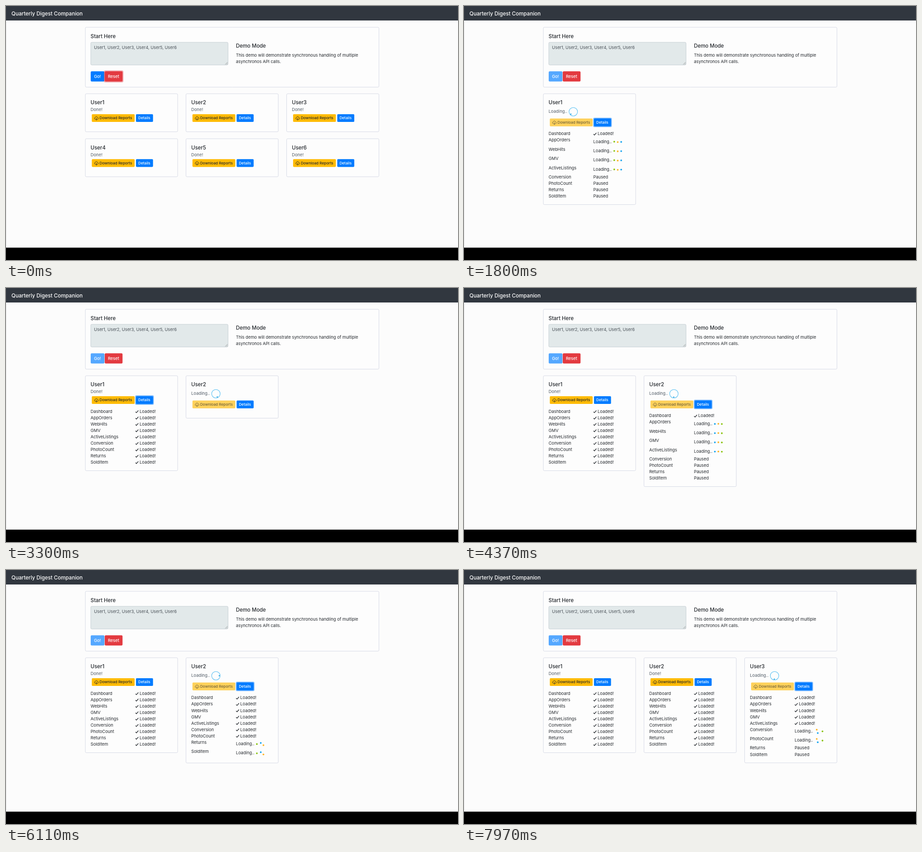
Recreate the animation shown at these times as an HTML page with a canvas. Size 998 by 561 pixels, loop 8000 ms.

```html
<!DOCTYPE html>
<html lang="en">
<head>
<meta charset="utf-8">
<title>Report loader</title>
<style>
html, body { margin: 0; width: 100%; height: 100%; overflow: hidden; background: #fcfcfc; }
canvas { display: block; width: 998px; height: 561px; }
</style>
</head>
<body>
<canvas id="stage"></canvas>
<script>
const W = 998, H = 561, LOOP = 8000;
const INK = '#24282d', MUTED = '#69727b', BLUE = '#007bff', RED = '#e33a40', AMBER = '#ffbb05';
const BODY = 9.3, HEAD = 11.4, SMALL = 8.2;
const PITCH = 222.2, ROW = 14.05, TALL_ROW = 20.4;
const CLEAR = 260, GO = 900;

const rows = ['Dashboard', 'AppOrders', 'WebHits', 'GMV', 'ActiveListings',
  'Conversion', 'PhotoCount', 'Returns', 'SoldItem'];

// Each batch of rows loads together: [first row, row after the last].
const batches = [[0, 1], [1, 5], [5, 7], [7, 9]];

// Times at which a user's batches begin, with the end of the last one.
const users = [
  { open: 1250, steps: [925, 1500, 2150, 2400, 2614] },
  { open: 3650, steps: [2614, 3450, 4750, 5600, 6209] },
  { open: 6650, steps: [6209, 6750, 7580, 8200, 8600] }
];

// Shuffling dots
const STEP = 122.5;
const DOT_COLORS = ['#8cc414', '#fdb62b', '#1ea7f0'];

const canvas = document.getElementById('stage');
const ctx = canvas.getContext('2d');
const dpr = window.devicePixelRatio || 1;
canvas.width = W * dpr;
canvas.height = H * dpr;

function text(str, x, midY, size = BODY, color = INK, weight = 400) {
  ctx.font = `${weight} ${size}px Inter, "Open Sans", sans-serif`;
  ctx.fillStyle = color;
  ctx.fillText(str, x, midY + size * 0.36);
}

function box(x, y, w, h, r, fill, stroke) {
  ctx.beginPath();
  ctx.roundRect(x, y, w, h, r);
  if (fill) {
    ctx.fillStyle = fill;
    ctx.fill();
  }
  if (stroke) {
    ctx.strokeStyle = stroke;
    ctx.lineWidth = 1;
    ctx.stroke();
  }
}

function disc(x, y, r, color) {
  ctx.beginPath();
  ctx.arc(x, y, r, 0, Math.PI * 2);
  ctx.fillStyle = color;
  ctx.fill();
}

function line(points, color, width) {
  ctx.beginPath();
  points.forEach(([x, y]) => ctx.lineTo(x, y));
  ctx.strokeStyle = color;
  ctx.lineWidth = width;
  ctx.stroke();
}

function card(x, y, w, h) {
  box(x, y, w, h, 2.3, '#fdfdfd', '#d6d9e5');
}

function cloud(x, y) {
  ctx.save();
  ctx.translate(x, y);
  ctx.beginPath();
  ctx.moveTo(3, 6.3);
  ctx.lineTo(2.4, 6.3);
  ctx.bezierCurveTo(-0.2, 6.2, -0.1, 3.1, 2, 2.9);
  ctx.bezierCurveTo(2.5, -0.3, 6.7, -0.2, 7.1, 2.7);
  ctx.bezierCurveTo(9.8, 2.8, 9.7, 6.3, 7.3, 6.3);
  ctx.lineTo(6.4, 6.3);
  ctx.strokeStyle = INK;
  ctx.lineWidth = 0.95;
  ctx.stroke();
  line([[4.7, 3.6], [4.7, 8.2]], INK, 0.95);
  line([[3, 6.7], [4.7, 8.4], [6.4, 6.7]], INK, 0.95);
  ctx.restore();
}

function downloadButton(x, midY, enabled) {
  ctx.globalAlpha = enabled ? 1 : 0.65;
  box(x, midY - 8.6, 94.5, 17.2, 1.8, AMBER);
  cloud(x + 5.4, midY - 3.8);
  text('Download Reports', x + 17, midY, SMALL, INK, 450);
  ctx.globalAlpha = 1;
}

function detailsButton(x, midY, focused, hover) {
  if (focused) box(x - 1.8, midY - 10.4, 41.2, 20.8, 3, 'rgba(0,123,255,.5)');
  box(x, midY - 8.6, 37.6, 17.2, 1.8, hover ? '#0064d0' : BLUE);
  text('Details', x + 5, midY, SMALL, '#fff', 500);
}

function ring(x, y, age) {
  ctx.beginPath();
  ctx.arc(x, y, 9.4, 0, Math.PI * 2);
  ctx.strokeStyle = '#52bdf2';
  ctx.lineWidth = 1.1;
  ctx.stroke();
  const a = Math.PI + age / 1000 * Math.PI * 2;
  disc(x + 7.4 * Math.cos(a), y + 7.4 * Math.sin(a), 1.3, '#189fe0');
}

// Neighbouring dots trade places along a half circle, left pair and right pair in turn.
function shuffle(x, y, t) {
  const phase = (((t - 1800) / STEP + 0.03) % 6 + 6) % 6;
  const done = Math.floor(phase);
  const order = [0, 1, 2];
  for (let i = 0; i < done; i++) {
    const k = i % 2;
    [order[k], order[k + 1]] = [order[k + 1], order[k]];
  }
  const gap = 7.7, left = done % 2, a = (phase - done) * Math.PI;
  order.forEach((color, slot) => {
    let dx = slot * gap, dy = 0;
    if (slot === left || slot === left + 1) {
      const side = slot === left ? -1 : 1;
      dx = (left + 0.5) * gap + side * Math.cos(a) * gap / 2;
      dy = side * Math.sin(a) * gap / 2;
    }
    disc(x + dx, y + dy, 1.9, DOT_COLORS[color]);
  });
}

function rowStatus(x, y, state, t) {
  if (state === 'loaded') {
    line([[x + 0.4, y + 1], [x + 2.5, y + 3], [x + 6.8, y - 1.9]], INK, 1.35);
    text('Loaded!', x + 9.6, y);
  } else if (state === 'loading') {
    text('Loading..', x, y + 3.2);
    shuffle(x + 46.2, y + 4, t);
  } else {
    text('Paused', x, y);
  }
}

function rowState(i, batch) {
  if (batch >= batches.length) return 'loaded';
  const [from, to] = batches[batch];
  return i < from ? 'loaded' : i < to ? 'loading' : 'paused';
}

function userCard(i, y, t, { batch, open, focused, hover, age }) {
  const x = 175 + (i % 3) * PITCH;
  const done = batch >= batches.length;
  const shift = done ? 0 : 9.7;
  const states = rows.map((_, n) => rowState(n, batch));
  const first = y + 78.6 + shift;
  let height = 84 + shift;
  if (open) {
    const busy = states.filter(s => s === 'loading').length;
    height = 78.6 + shift + 8 * ROW + busy * (TALL_ROW - ROW) + 18.7;
    if (states[8] === 'loading') height += 0.3;
  }
  card(x + 0.2, y, 203.8, height);
  text('User' + (i + 1), x + 11.8, y + 19.3, HEAD, INK, 500);
  text(done ? 'Done!' : 'Loading..', x + 11.8, y + (done ? 35.2 : 39.2), BODY, MUTED, 500);
  if (!done) ring(x + 66.3, y + 39.8, age);
  const mid = y + 53.7 + shift;
  downloadButton(x + 14.5, mid, done);
  detailsButton(x + 112, mid, focused, hover);
  if (!open) return;
  let rowY = first;
  rows.forEach((name, n) => {
    text(name, x + 11.8, rowY);
    rowStatus(x + 110.5, rowY, states[n], t);
    rowY += states[n] === 'loading' ? TALL_ROW : ROW;
  });
}

function page(t) {
  ctx.fillStyle = '#fcfcfc';
  ctx.fillRect(0, 0, W, H);
  ctx.fillStyle = '#dfdfdf';
  ctx.fillRect(0, 32, 0.7, 502);
  ctx.fillStyle = '#31373f';
  ctx.fillRect(0, 0, W, 32);
  ctx.fillStyle = '#000';
  ctx.fillRect(0, 533.7, W, H - 533.7);
  text('Quarterly Digest Companion', 12, 17, 11.6, '#fff', 500);

  card(175.2, 47, 648.2, 132.2);
  text('Start Here', 186.8, 67, HEAD, INK, 500);
  box(187.2, 80.2, 303, 50, 2.3, '#e2e9ea', '#c6ced4');
  text('User1, User2, User3, User4, User5, User6', 194.3, 91.2, BODY, '#495057');
  line([[484, 129.3], [489.3, 124]], '#777', 0.7);
  line([[487, 129.3], [489.3, 127]], '#777', 0.7);

  text('Demo Mode', 507.8, 88, HEAD, INK, 500);
  text('This demo will demonstrate synchronous handling of multiple', 507.8, 108.2);
  text('asynchronos API calls.', 507.8, 122.4);

  box(187, 144.3, 30.3, 22.5, 2.3, t < GO ? BLUE : '#55a8ff');
  text('Go!', 194.2, 155.8, BODY, '#fff', 500);
  if (t < GO) box(215.9, 142.3, 43.4, 26.5, 3.6, 'rgba(226,70,78,.45)');
  box(218, 144.3, 39.3, 22.5, 2.3, RED);
  text('Reset', 224.9, 155.8, BODY, '#fff', 500);
}

function draw(t) {
  ctx.setTransform(dpr, 0, 0, dpr, 0, 0);
  page(t);
  if (t < CLEAR) {
    for (let i = 0; i < 6; i++) {
      userCard(i, i < 3 ? 193.8 : 293.1, t, { batch: 4 });
    }
    return;
  }
  users.forEach((user, i) => {
    const start = user.steps[0];
    if (t < start) return;
    const next = users[i + 1];
    userCard(i, 193.8, t, {
      batch: user.steps.filter(s => t >= s).length - 1,
      open: t >= user.open,
      focused: t >= user.open && !(next && t >= next.open),
      hover: t >= user.open - 150 && t < user.open + 300,
      age: t - start
    });
  });
}

function tick() {
  draw(performance.now() % LOOP);
  requestAnimationFrame(tick);
}
tick();
</script>
</body>
</html>
```
